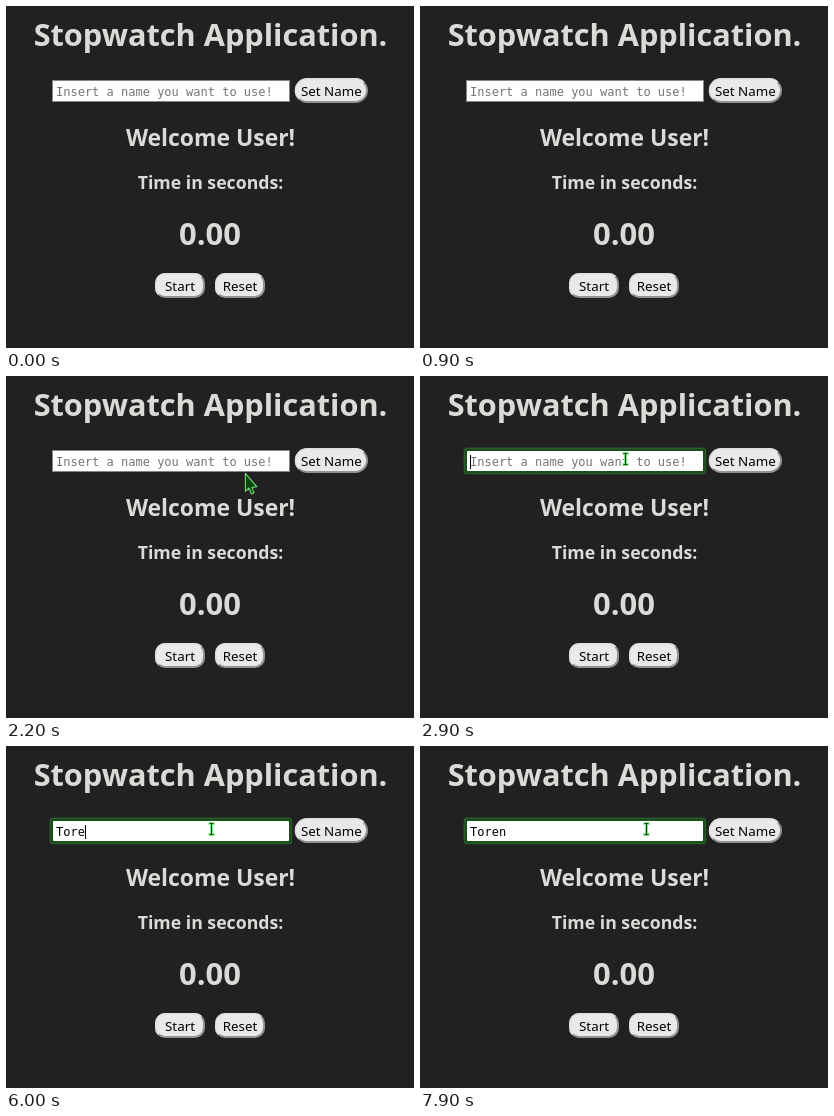
Animation of 408x342 px, one loop 8000 ms. Source, as an HTML page with a canvas:

```html
<!DOCTYPE html>
<html lang="en">
<head>
<meta charset="utf-8">
<title>Stopwatch</title>
<style>
  html, body { margin: 0; width: 100%; height: 100%; overflow: hidden; background: #212121; }
  canvas { display: block; }
</style>
</head>
<body>
<canvas id="stage"></canvas>
<script>
const W = 408, H = 342, LOOP = 8000, STEP = 100;
const SANS = '"Noto Sans", "Open Sans", sans-serif';
const MONO = '"DejaVu Sans Mono", monospace';
const CHAR = 7.224;
const NAME = 'Toren';
const KEY_TIMES = [5300, 5700, 5900, 6000, 6200];
const FOCUS = 2700;

// Pointer stops: time, x, y
const PATH = [
  [1300, 416, 56], [1500, 336, 82], [1700, 272, 107], [1800, 273, 114],
  [2000, 262, 106], [2500, 205.5, 83], [7700, 205.5, 83], [7900, 226.5, 83]
];

const canvas = document.getElementById('stage');
const ctx = canvas.getContext('2d');
const dpr = window.devicePixelRatio || 1;
canvas.width = W * dpr;
canvas.height = H * dpr;
canvas.style.width = W + 'px';
canvas.style.height = H + 'px';

function text(str, x, y, font, color, align = 'center') {
  ctx.font = font;
  ctx.fillStyle = color;
  ctx.textAlign = align;
  ctx.fillText(str, x, y);
}

function heading(str, x, y, size) {
  text(str, x, y, `bold ${size}px ${SANS}`, '#dcdad7');
}

function box(x, y, w, h, r, color) {
  ctx.fillStyle = color;
  ctx.beginPath();
  ctx.roundRect(x, y, w, h, r);
  ctx.fill();
}

function poly(points) {
  ctx.beginPath();
  points.forEach(([x, y]) => ctx.lineTo(x, y));
  ctx.closePath();
}

function button(label, x, y, w, h, r) {
  box(x, y, w, h, r, '#929292');
  // Lit top and left edges of the outset border
  ctx.save();
  poly([[x, y], [x + w, y], [x + w - 12, y + 12], [x + 12, y + h - 12], [x, y + h]]);
  ctx.clip();
  box(x, y, w, h, r, '#dededf');
  ctx.restore();
  box(x + 1.5, y + 1.5, w - 3.5, h - 3.5, r - 1.5, '#e9e9eb');
  text(label, x + w / 2, y + 18, `13.333px ${SANS}`, '#000');
}

function caretOn(t) {
  return t >= FOCUS && t < 3800 || t >= 5000 && t < 7400;
}

function field(t) {
  if (t >= FOCUS) {
    box(43.6, 71.6, 242.6, 26.6, 3.5, '#2d582d');
    box(45, 73, 240, 24, 2, '#17501a');
    box(47, 75, 236, 20, 1, '#fff');
  } else {
    box(46, 74, 238, 22, 0, '#858585');
    box(47, 75, 236, 20, 0, '#fff');
  }
  const count = KEY_TIMES.filter(k => t >= k).length;
  const font = `12px ${MONO}`;
  if (count) text(NAME.slice(0, count), 50, 90, font, '#000', 'left');
  else text('Insert a name you want to use!', 50, 90, font, '#757575', 'left');
  if (caretOn(t)) {
    ctx.fillStyle = '#000';
    ctx.fillRect(Math.round(50 + count * CHAR), 79, 1, 14);
  }
}

function pointerAt(t) {
  if (t < PATH[0][0]) return null;
  const i = PATH.findIndex(p => p[0] > t);
  if (i < 0) return PATH[PATH.length - 1].slice(1);
  const [t0, x0, y0] = PATH[i - 1], [t1, x1, y1] = PATH[i];
  const k = (t - t0) / (t1 - t0);
  return [x0 + (x1 - x0) * k, y0 + (y1 - y0) * k];
}

function arrow(x, y) {
  poly([[0, 0.5], [0, 18.5], [3.6, 15.2], [6, 21.2], [8.6, 20], [6.6, 14.6], [11.5, 14]]
    .map(([dx, dy]) => [x + dx, y + dy]));
  ctx.fillStyle = '#0b430c';
  ctx.fill();
  ctx.strokeStyle = '#72d873';
  ctx.lineWidth = 1.1;
  ctx.lineJoin = 'round';
  ctx.stroke();
}

function beam(x, y) {
  const bars = grow => {
    ctx.fillRect(x - 2 - grow, y - 6 - grow, 4 + 2 * grow, 1 + 2 * grow);
    ctx.fillRect(x - 2 - grow, y + 5 - grow, 4 + 2 * grow, 1 + 2 * grow);
    ctx.fillRect(x - 0.5 - grow, y - 6, 1 + 2 * grow, 12);
  };
  ctx.fillStyle = '#86e887';
  bars(1);
  ctx.fillStyle = '#0e480f';
  bars(0);
}

function draw(t) {
  ctx.setTransform(dpr, 0, 0, dpr, 0, 0);
  ctx.fillStyle = '#212121';
  ctx.fillRect(0, 0, W, H);

  heading('Stopwatch Application.', 204.5, 40, 30.7);
  heading('Welcome User!', 204.5, 140, 22.9);
  heading('Time in seconds:', 204.5, 183, 17.7);
  heading('0.00', 204, 239, 31);

  field(t);
  button('Set Name', 288.7, 72, 73.3, 25, 12.5);
  button('Start', 149, 267, 50, 25, 10);
  button('Reset', 209, 267, 50, 25, 10);

  const p = pointerAt(t);
  if (!p) return;
  const [x, y] = p;
  const inField = x > 46 && x < 284 && y > 74 && y < 96;
  (inField ? beam : arrow)(x, y);
}

function tick() {
  const t = performance.now() % LOOP;
  draw(Math.floor(t / STEP) * STEP);
  requestAnimationFrame(tick);
}
tick();
</script>
</body>
</html>
```
